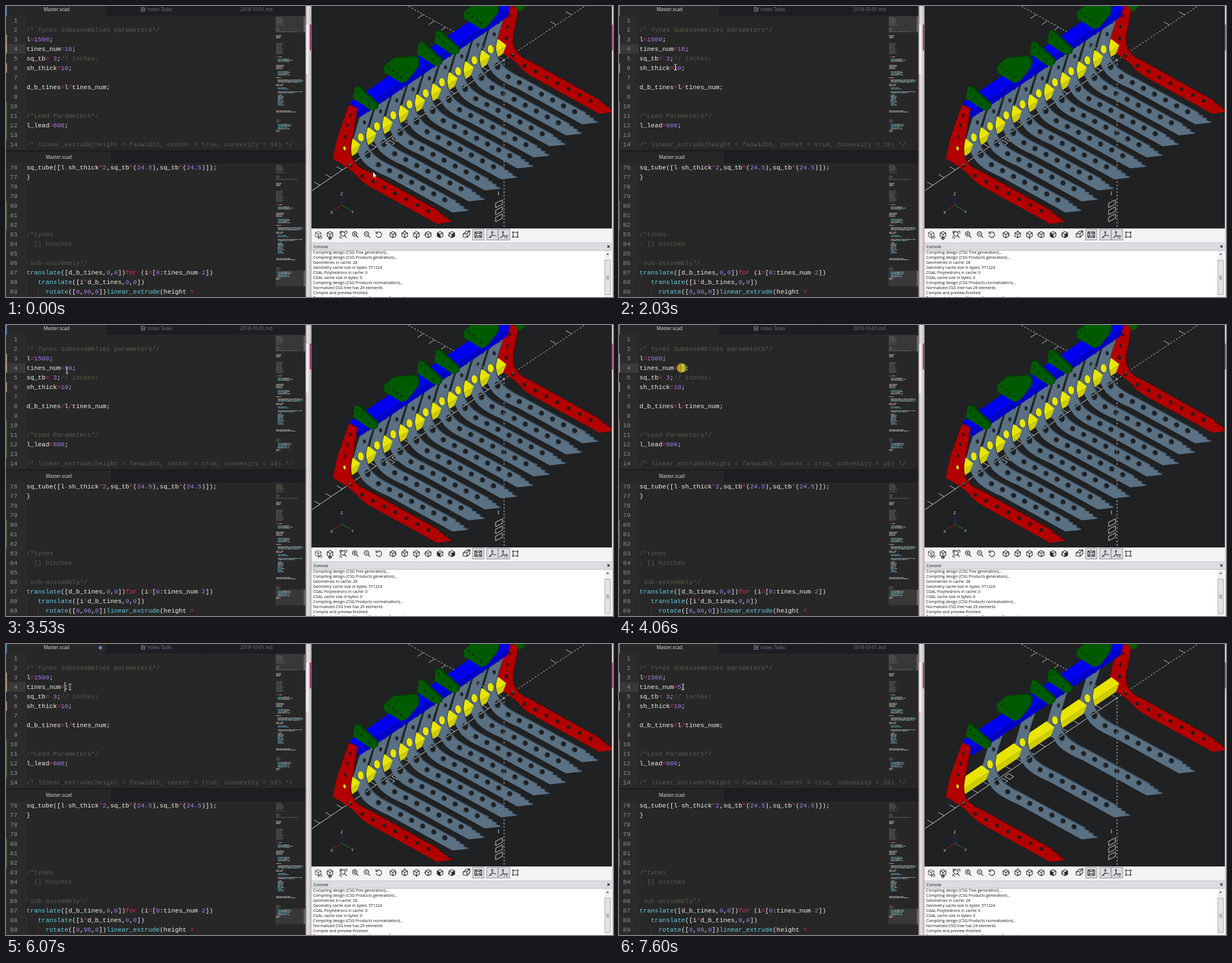
Recreate the animation shown at these times as an HTML page. Size 1081 by 518 pixels, loop 8 s.

```html
<!DOCTYPE html>
<html lang="en">
<head>
<meta charset="utf-8">
<title>Parametric tynes</title>
<style>
html, body { margin: 0; width: 100%; height: 100%; overflow: hidden; background: #272727; }
svg { display: block; width: 100vw; height: 100vh; }
text { white-space: pre; }
.code { font: 11.3px "Liberation Mono", monospace; fill: #f0f0ea; }
.num { font: 11.3px "Liberation Mono", monospace; fill: #8d8d88; text-anchor: end; }
.tab { font: 8.2px "Open Sans", "Noto Sans", sans-serif; fill: #777c85; text-anchor: middle; }
.on { fill: #e4e4e4; }
.log { font: 7.05px "Open Sans", "Noto Sans", sans-serif; fill: #111; }
.axis { font: 7px "Liberation Sans", sans-serif; fill: #ddd; text-anchor: middle; }
.ico { fill: none; stroke: #2b2b2b; stroke-width: 1.2; stroke-linejoin: round; }
</style>
</head>
<body>
<svg id="stage" viewBox="0 0 1081 518" preserveAspectRatio="none"></svg>
<script>
const LOOP = 8000;
const stage = document.getElementById('stage');

const rect = (x, y, w, h, fill, more = '') =>
  `<rect x="${x}" y="${y}" width="${w}" height="${h}" fill="${fill}" ${more}/>`;
const path = (d, fill, more = '') => `<path d="${d}" fill="${fill}" ${more}/>`;
const line = (d, color, w = 1, more = '') => path(d, 'none', `stroke="${color}" stroke-width="${w}" ${more}`);
const text = (x, y, cls, s, more = '') => `<text x="${x}" y="${y}" class="${cls}" ${more}>${s}</text>`;
const poly = (pts, fill, more = '') => `<polygon points="${pts.map(p => p.join()).join(' ')}" fill="${fill}" ${more}/>`;

// ---- code editor ----
const COLORS = { note: '#5d5a4e', num: '#a57ff0', op: '#e8306c', fn: '#66d0e6' };
const TOKEN = /(\/\*.*|\/\/.*)|\b(\d[\d.]*)|([=*\/+-]|\bfor\b)|\b(translate|rotate|linear_extrude)\b/g;

function paint(src, note) {
  if (note) return `<tspan fill="${COLORS.note}">${src}</tspan>`;
  return src.replace(TOKEN, (s, a, b, c) => {
    const kind = a ? 'note' : b ? 'num' : c ? 'op' : 'fn';
    return `<tspan fill="${COLORS[kind]}">${s}</tspan>`;
  });
}

const TOP = ['', '/* Tynes Subassemblies parameters*/', 'l=1500;', 'tines_num=10;', 'sq_tb= 3;// inches;',
  'sh_thick=10;', '', 'd_b_tines=l/tines_num;', '', '', '/*Lead Parameters*/', 'l_lead=600;', '',
  '/* linear_extrude(height = fanwidth, center = true, convexity = 10) */'];
const LOW = ['sq_tube([l-sh_thick*2,sq_tb*(24.5),sq_tb*(24.5)]);', '}', '', '', '', '', '', '/*tynes',
  '- [] hinches', '', ' sub-asssembly*/', 'translate([d_b_tines,0,0])for (i=[0:tines_num-2])',
  '   translate([i*d_b_tines,0,0])', '     rotate([0,90,0])linear_extrude(height ='];

function listing(lines, first, y0) {
  return lines.map((s, i) => {
    const n = first + i, y = y0 + i * 17.02;
    return text(20.5, y, 'num', n) +
      text(36.5, y, 'code', paint(s, n > 82 && n < 87), n === 4 ? 'id="edit"' : '');
  }).join('');
}

// first row, last row, widest line, accent
const BLOCKS = [[20, 30, 14, 0], [33, 33, 16, 0], [39, 43, 8, 0], [45, 45, 50, 0], [52, 56, 12, 1], [66, 84, 14, 0],
  [90, 90, 11, 2], [94, 98, 31, 3], [105, 112, 16, 1], [116, 123, 26, 3], [127, 128, 10, 2], [131, 136, 50, 3],
  [139, 142, 14, 2], [145, 148, 26, 3], [152, 155, 50, 3], [158, 176, 15, 3], [186, 188, 35, 1], [202, 206, 9, 0],
  [210, 218, 28, 3], [221, 223, 8, 1]];

function minimap(dy) {
  let seed = 7, out = '';
  const rnd = () => (seed = (seed * 16807) % 2147483647) / 2147483647;
  const tint = ['#66645c', '#b9b9b4', '#b83a66', '#55a5b8'];
  for (const [a, b, w, c] of BLOCKS)
    for (let y = a; y <= b; y += 2) {
      const end = 481 + w * (.65 + .35 * rnd());
      for (let x = 481 + (c === 3 ? 3 : 0); x < end;) {
        const len = Math.min(2 + rnd() * 5, end - x);
        out += rect(x.toFixed(1), y + dy, len.toFixed(1), 1.2, rnd() < .45 ? tint[c] : tint[c ? 1 : 0], 'opacity=".85"');
        x += len + .6;
      }
    }
  return out;
}

function editor() {
  const mark = (y, h, c) => rect(0, y, 1.6, h, c);
  return rect(0, 0, 534, 518, '#272727') + rect(0, 17, 35, 240, '#2b2b2b') +
    rect(178, 0, 356, 17, '#1c1e22') + rect(357, 0, 1, 17, '#15171a') + rect(0, 0, 1.5, 17, '#5a86d8') +
    text(90, 8.9, 'tab on', 'Master.scad') + text(274, 8.9, 'tab', 'notes Tasks') + text(446, 8.9, 'tab', '2018-10-01.md') +
    line('M246 2.5h-5v7h6v-3M242.5 5h3M242.5 7h2M245 7l4-4', '#858a92', 1.1) +
    '<circle id="dirty" cx="168" cy="6.5" r="3" fill="#5a86d8"/>' +
    rect(0, 68, 35, 17, '#393937') +
    mark(51, 34, '#b5a07c') + mark(102, 17, '#b5a07c') + mark(170, 68, '#4d6b45') +
    rect(480, 18, 53, 29, '#383838') + rect(530, 19, 3, 28, '#606060') + minimap(0) +
    listing(TOP, 1, 28.6) +
    rect(0, 257, 534, 261, '#272727') + rect(0, 280, 35, 238, '#2b2b2b') +
    rect(0, 257, 534, 2, '#1a1a1a') + rect(187, 259, 347, 21, '#1c1e22') +
    text(94, 272, 'tab on', 'Master.scad') + mark(347, 51, '#4d6b45') +
    rect(480, 471, 53, 28, '#383838') + rect(530, 471, 3, 28, '#606060') + minimap(263) +
    line('M37 450v10M37 484v34M57.5 501v17', '#3a3a3a') +
    listing(LOW, 76, 290.8);
}

// ---- solid model ----
const STEP = [28.9, -19.6];
const at = (t, [x, y]) => [x + STEP[0] * t, y + STEP[1] * t];
const hole = (x, y, a, b) => `M${x - a} ${y}a${a} ${b} 0 1 0 ${2 * a} 0a${a} ${b} 0 1 0 ${-2 * a} 0z`;
const row = (a, b) => Array.from({ length: 7 }, (_, i) => hole(634 + 19.7 * i, 302.5 + 10.4 * i, a, b)).join('');
const TEETH = 'L772 367L771 370L779 372L778 375L786 377L785 380L795 384';

const SIDE = 'M611 176L625 183L618 228Q611 252 614 266Q620 286 640 293L655 301L764 362' + TEETH +
  'L768 388L654 325Q638 317 628 306Q618 292 582 272L590 235Z' +
  hole(613, 195, 2.4, 3.4) + hole(608, 213, 2.4, 3.4) + hole(604, 233, 2.4, 3.4) + hole(602, 254, 3, 4) +
  hole(613, 284, 3.4, 3.8) + row(3.5, 3.6);
const TYNE = 'M615 172L634 172L624 204Q612 238 611 252Q612 270 624 283Q634 294 660 306L764 363' + TEETH +
  'L766 387L652 324Q620 311 607 296Q592 275 590 255Q596 232 604 208Z' +
  hole(617, 205, 2.6, 3.6) + hole(609, 227, 3, 4) + hole(602, 254, 6, 8) + hole(615, 284, 5.5, 7) + row(5, 4.8);

function plate(t, d, face, edge) {
  const layer = (fill, dx, dy) => {
    const [x, y] = at(t, [dx, dy]);
    return path(d, fill, `fill-rule="evenodd" transform="translate(${x.toFixed(1)} ${y.toFixed(1)})"`);
  };
  return layer(edge, 1.6, -1.1) + layer(face, 0, 0);
}

const CORNERS = [[588, 255], [602, 266], [596, 281]];
function bar(a, b) {
  const [p, q] = [a + .05, b].map(t => CORNERS.map(c => at(t, c)));
  const face = (i, c) => poly([p[i], p[i + 1], q[i + 1], q[i]], c);
  return face(0, '#e8e600') + face(1, '#cfcd00');
}

function bracket(pts, holes) {
  const solid = (p, c) => poly(p, c, `stroke="${c}" stroke-width="2" stroke-linejoin="round"`);
  return solid(pts.map(([x, y]) => [x + 3, y - 2]), '#003d00') + solid(pts, '#005a00') +
    path(holes.map(([x, y]) => hole(x, y, 1.6, 2)).join(''), '#002c00');
}
const lug = (x, y) => bracket([[x, y], [x + 5, y], [x + 38, y + 31], [x + 36, y + 39], [x + 29, y + 40], [x - 3, y + 19]],
  [[x + 4, y + 8], [x + 11, y + 18], [x + 24, y + 30]]);
const horn = (x, y) => bracket([[x, y + 17], [x + 16, y + 3], [x + 54, y], [x + 59, y + 5], [x + 58, y + 18],
  [x + 39, y + 42], [x + 30, y + 45], [x + 1, y + 27]], [[x + 8, y + 18], [x + 15, y + 24], [x + 22, y + 30], [x + 29, y + 36]]);

function model(n) {
  const d = 10 / n;
  let out = plate(10, SIDE, '#b20000', '#6e0000');
  for (let i = n - 1; i > 0; i--) out += bar(i * d, (i + 1) * d) + plate(i * d, TYNE, '#5a7083', '#3b4a57');
  out += bar(0, d) +
    poly([[612, 172], [892, -18], [898, 4], [622, 190]], '#0000f0') +
    poly([[622, 190], [898, 4], [893, 20], [629, 199]], '#0000c8') +
    horn(816, -5) + lug(767, 46) + lug(736, 66) + horn(674, 91) + lug(622, 145) +
    bracket([[904, -4], [920, -4], [922, 4], [915, 9]], []);
  return out + plate(0, SIDE, '#b20000', '#6e0000');
}

function axes() {
  const ticks = (x0, x1, dx, k, tx, ty) => {
    let d = '';
    for (let x = x0; x < x1; x += dx) d += `M${x} ${(96 + (x - 887) * k).toFixed(1)}l${tx} ${ty}`;
    return line(d, '#ddd', .9);
  };
  const digit = y => `M872 ${y}l12-6v8l-12 6z`;
  return line('M545 328.6L887 96', '#ddd') + ticks(559, 870, 20, -.68, -10, -5.6) +
    line('M887 96L1031 0M887 96L716 0M887 96V395', '#ddd', 1, 'stroke-dasharray="3 3"') +
    ticks(980, 1040, 27, -.67, -10, -5.6) + ticks(743, 860, 20, .56, -10, 6.6) +
    line('M877 330v7' + digit(351) + digit(363.5) + digit(376), '#ddd') +
    line('M676 244l9 5l7-5l-9-5zM687 236l9 5l7-5l-9-5z', '#ddd');
}

function gizmo() {
  return line('M598 355V340', '#2a2ab0') + line('M598 355L583 364', '#b02020') + line('M598 355L613 363', '#208820') +
    text(598, 336.5, 'axis', 'Z') + text(580, 370, 'axis', 'X') + text(617, 369, 'axis', 'Y');
}

// ---- toolbar and console ----
const CUBE = 'M-5-3L0-5.5L5-3V3L0 5.5L-5 3ZM-5-3L0-.5L5-3M0-.5V5.5';
const LENS = 'M3-1.2a4 4 0 1 1-8 0a4 4 0 1 1 8 0M2 2L5.5 5.5';
const ICONS = [
  [556, CUBE + 'M0 2l3 3l-3 3M4 2l3 3l-3 3', 'stroke-dasharray="2 1"'], [577, CUBE + 'M-3 6h6l-3 3z'],
  [601, LENS + 'M-6-2v-4h4M2-6h4v4M-6 2v4h4'], [622, LENS + 'M-3-1.2h4M-1-3.2v4'], [643, LENS + 'M-3-1.2h4'],
  [664, 'M-4-3a5 5 0 1 1-1 4M-5-6v4h4'],
  [689, CUBE + 'M3 0h4'], [710, CUBE + 'M0-8v4'], [731, CUBE + 'M0 4v4'], [752, CUBE + 'M-8 0h4'],
  [773, CUBE, '', 'M-5-3L0-.5V5.5L-5 3Z'], [794, CUBE + 'M-7 1h4', '', 'M0-.5L5-3V3L0 5.5Z'],
  [820, 'M-6-1L1-2V5L-6 4ZM-6-1L0-6L6-7L1-2M6-7V0L1 5'], [841, 'M-6-5H6V5H-6ZM-3-2.5H3V2.5H-3ZM-6-5l3 2.5M6-5l-3 2.5M-6 5l3-2.5M6 5l-3-2.5'],
  [866, 'M0-7V1L7 2M0 1L-6 6M-2-4h4M-4 3l2 2'], [887, 'M-2-7V2H7M-2 2L-7 6M-4-4h4'],
  [907, 'M-4-4H4V4H-4ZM-6-4h3M-4-6v3M6 4h-3M4 6v-3M6-4h-3M4-6v3M-6 4h3M-4 6v-3']];

function toolbar() {
  const down = x => rect(x, 397.5, 20, 19, '#dcdce0', 'stroke="#8c8c90"');
  return rect(544, 396, 535, 26, '#f4f3f4') + rect(544, 421, 535, 1, '#c8c6c9') + down(831) + down(856) + down(877) +
    ICONS.map(([x, d, more = '', solid]) => `<g transform="translate(${x} 407)">` +
      (solid ? path(solid, '#2b2b2b') : '') + `<path class="ico" d="${d}" ${more}/></g>`).join('') +
    text(885.5, 414, 'log', '10', 'font-weight="bold"');
}

const LOG = ['Compiling design (CSG Tree generation)...', 'Compiling design (CSG Products generation)...', 'Geometries in cache: 28',
  'Geometry cache size in bytes: 571224', 'CGAL Polyhedrons in cache: 0', 'CGAL cache size in bytes: 0',
  'Compiling design (CSG Products normalization)...', 'Normalized CSG tree has 29 elements', 'Compile and preview finished.',
  'Total rendering time: 0 hours, 0 minutes, 0 seconds'];

function consolePane() {
  return rect(544, 422, 535, 96, '#fff') + rect(544, 422, 535, 13, '#dcdde2') + rect(544, 434.5, 535, 1, '#b4b4b8') +
    text(547.5, 431, 'log', 'Console') + line('M1071 426l4 4.4M1075 426l-4 4.4', '#222', 1.2) +
    '<clipPath id="pane"><path d="M544 436H1066V518H544Z"/></clipPath><g clip-path="url(#pane)">' +
    LOG.map((s, i) => text(547, 440.6 + i * 9, 'log', s, i === 7 ? 'id="count"' : '')).join('') + '</g>' +
    rect(1066, 436, 11, 82, '#efeff0') + path('M1069 443l2.5-3l2.5 3z', '#555') +
    rect(1066.5, 452.5, 10, 61, '#e2e2e4', 'stroke="#a9a9ac"') + line('M1069 481h5M1069 483.5h5M1069 486h5', '#777');
}

function frame() {
  return rect(533.5, 0, 10.5, 518, '#e2d8db') + rect(534, 0, 1, 518, '#8b8789') + rect(540, 0, 3, 518, '#cfc5c8') +
    rect(534.5, 33, 4, 88, '#f3eef0') + rect(541, 33, 2.5, 46, '#a1306a') +
    rect(1079, 0, 2, 518, '#e0d4d8') + rect(1079.5, 33, 1.5, 46, '#a1306a') + rect(543.5, 0, 1, 518, '#777');
}

stage.innerHTML = editor() + frame() +
  '<clipPath id="view"><path d="M544.5 0H1079V396H544.5Z"/></clipPath><g clip-path="url(#view)">' +
  rect(544, 0, 535, 396, '#1f2122') + axes() +
  `<g id="dense">${model(10)}</g><g id="sparse">${model(5)}</g>` + gizmo() + '</g>' +
  toolbar() + consolePane() +
  '<circle id="click" cx="111.5" cy="76.5" r="8.5" fill="#d8c800" opacity=".72"/>' +
  rect(-.5, 68, 1, 17, '#f4f4f0', 'id="caret"') +
  line('M-2.5-5h2q.5 0 .5 .5q0-.5 .5-.5h2M0-4.5V4.5M-2.5 5h2q.5 0 .5-.5q0 .5 .5 .5h2', '#e8e8e8', 1, 'id="beam"') +
  path('M0 0V10L2.3 7.9L3.9 11L5.3 10.4L3.8 7.3H7Z', '#fff', 'id="arrow" stroke="#222" stroke-width=".5"');

// ---- timeline: time, pointer x, pointer y, value, caret x ----
const STEPS = [
  [0, 653.5, 295.5, '10', 0], [500, 304.5, 131, '10', 0], [1050, 61, 142, '10', 0], [1520, 91.5, 116, '10', 0],
  [2030, 100.5, 109, '10', 0], [2510, 95, 92, '10', 0], [3040, 95.5, 92, '10', 0], [3530, 108.5, 81, '10', 0],
  [4060, 114, 76.5, '10', 0], [4550, 114, 76.5, '10', 0], [5070, 114, 76.5, '10', 118], [5580, 114, 76.5, '1', 111.5],
  [6070, 114, 76.5, '', 105], [6590, 114, 76.5, '5', 111.5], [7090, 114, 76.5, '5', 0], [7600, 114, 76.5, '5', 0]];

const el = id => document.getElementById(id);
const show = (id, on) => { el(id).style.display = on ? '' : 'none'; };
const move = (id, x, y) => el(id).setAttribute('transform', `translate(${x} ${y})`);
let shown = -1;

function draw(now) {
  const t = now % LOOP;
  const i = STEPS.findLastIndex(s => s[0] <= t);
  if (i !== shown) {
    const [start, x, y, value, caret] = STEPS[i];
    shown = i;
    show('arrow', start < 500);
    show('beam', start >= 500);
    move('arrow', x, y);
    move('beam', x, y);
    show('click', start === 4060);
    show('caret', caret);
    move('caret', caret, 0);
    show('dirty', start >= 6070 && start < 7090);
    show('dense', start < 7600);
    show('sparse', start >= 7600);
    el('edit').innerHTML = paint(`tines_num=${value};`);
    el('count').textContent = `Normalized CSG tree has ${start < 7090 ? 29 : 24} elements`;
  }
  requestAnimationFrame(() => draw(performance.now()));
}
draw(performance.now());
</script>
</body>
</html>
```
